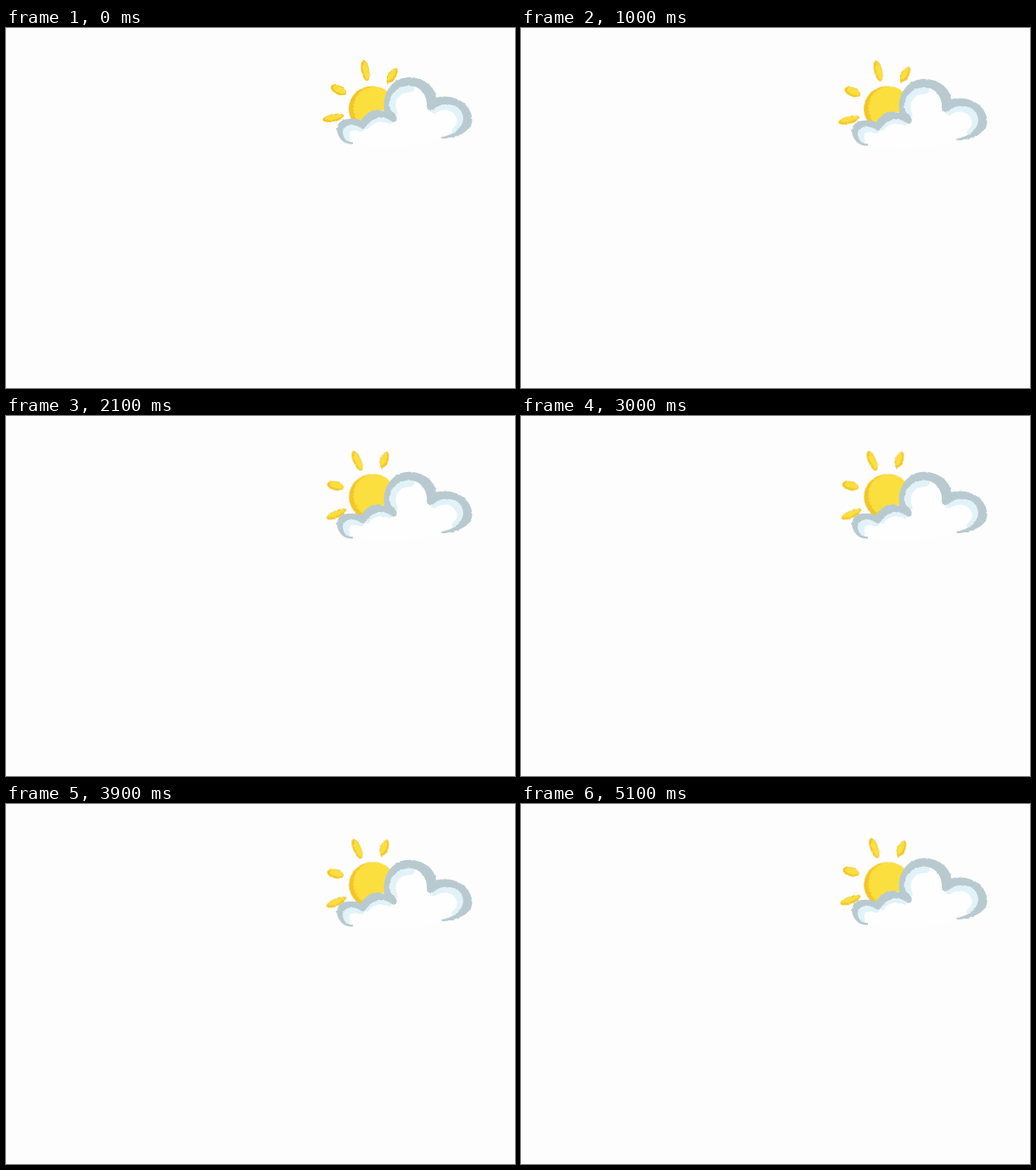
An HTML page for the animation above (5200 ms loop, 600 by 424 pixels).

```html
<!DOCTYPE html>
<html lang="en">
<head>
<meta charset="utf-8">
<title>Sun and cloud</title>
<style>
  html, body { margin: 0; width: 100%; height: 100%; overflow: hidden; background: #fdfdfd; }
  svg { display: block; width: 100vw; height: 100vh; }
  .deep { fill: #f3c526; }
  .bright { fill: #fbdf3e; }
  .body { fill: #fefefe; }
  .shade { fill: none; stroke: #e2f2f9; stroke-width: 9; stroke-linecap: round; }
  .rim { fill: #b8cad0; }
</style>
</head>
<body>
<svg viewBox="0 0 600 424">
  <defs>
    <filter id="rough" filterUnits="userSpaceOnUse" x="360" y="25" width="205" height="135" color-interpolation-filters="sRGB">
      <feTurbulence type="fractalNoise" baseFrequency=".22" numOctaves="2" seed="4"/>
      <feDisplacementMap in="SourceGraphic" scale="2.6" xChannelSelector="R" yChannelSelector="G"/>
    </filter>
  </defs>

  <g id="sun" filter="url(#rough)">
    <ellipse class="deep" cx="431.5" cy="95" rx="27.5" ry="26.5"/>
    <ellipse class="bright" cx="434" cy="94.5" rx="25" ry="25.5"/>
    <path d="M413 79Q406 94 413 110" fill="none" stroke="#f3c526" stroke-width="2" stroke-dasharray="1.5 3"/>
    <g id="rays"></g>
  </g>

  <g id="cloud">
    <g filter="url(#rough)">
      <path class="body" d="M409 136C388 138 389 110 404 108Q412 107 420 112C425 101 437 94 447 97C445 75 458 60 475 60C493 60 506 72 506 83C530 76 548 92 548 107C548 122 534 128 513 130C495 140 440 143 409 136Z"/>
      <path class="shade" d="M418 118C406 112 397 120 401 131"/>
      <path class="shade" d="M424 115C431 105 444 104 452 108"/>
      <path class="shade" d="M457 100C450 83 462 71 477 71" stroke-width="11"/>
      <path class="shade" d="M504 96C517 88 533 93 536 107C537 113 534 118 530 121"/>
      <path class="rim" d="M409 136.5C399 138 391 130 390 120C390 111 397 107 405 107C411 106.500 416 107.500 419 109C423 100 434 94 446 97C443 76 456 58 475 58C492 58 506 69 507 82C530 76 549 91 549.500 107C550 121 536 127 519 130Q513 131 513 128.500C527 126 538 119 539 107C539 96 530 89.500 519 90C511 90 508 93 504 96C500 99 496 97 496 92C497 78 487 68 476 68C460 68 450 81 452 92C453 98 457 100 460 104C462 108 459 113 455 110C444 102 431 105 425 116Q421 121 417 117C407 110 396 116 397 124C398 131 402 134 409 134.500Z"/>
    </g>
  </g>
</svg>
<script>
  const LOOP = 5200, STEP = 100;
  const PIVOT = "431 94", TURN = -1.65;
  // cloud drop in px over one bob; the sun turns along with it
  const BOB = [0, 2, 5, 7.8, 8.6, 7.7, 5.8, 3.8, 1.7];
  const sun = document.getElementById("sun");
  const cloud = document.getElementById("cloud");

  // centre x, centre y, half length, half width, tilt
  const rays = [
    [423.5, 50, 12.5, 4.7, 80],
    [455, 56, 10, 4.5, -57],
    [392, 73, 10, 5.2, 27],
    [385.8, 105.8, 12.7, 4.4, -11]
  ];
  const ellipse = (cls, x, y, rx, ry) =>
    `<ellipse class="${cls}" cx="${x}" cy="${y}" rx="${rx}" ry="${ry}"/>`;
  document.getElementById("rays").innerHTML = rays.map(([x, y, l, w, tilt]) =>
    `<g transform="translate(${x} ${y}) rotate(${tilt})">` +
    ellipse("deep", 0, 0, l, w) + ellipse("bright", 0.6, -0.8, l - 2, w - 1.5) + "</g>"
  ).join("");

  const start = performance.now();
  function draw() {
    const t = (performance.now() - start) % LOOP;
    const drop = BOB[Math.floor(t / STEP) % BOB.length];
    cloud.setAttribute("transform", `translate(0 ${drop})`);
    sun.setAttribute("transform", `rotate(${drop * TURN} ${PIVOT})`);
    requestAnimationFrame(draw);
  }
  draw();
</script>
</body>
</html>
```
